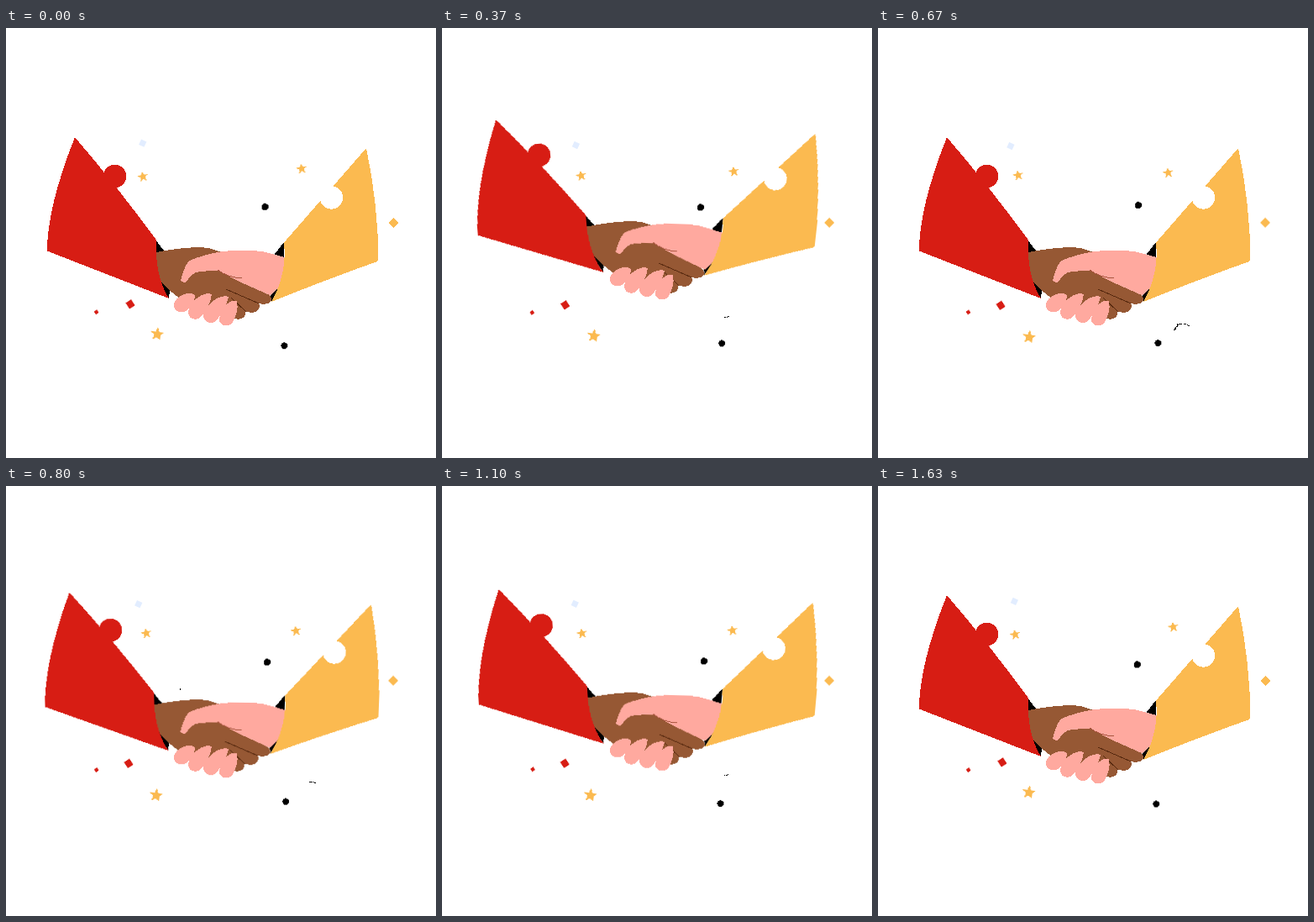
An HTML page that plays this animation: 512x512 px, repeating every 1670 ms.

```html
<!DOCTYPE html>
<html lang="en">
<head>
<meta charset="utf-8">
<title>Handshake</title>
<style>
  html, body { margin: 0; width: 100%; height: 100%; overflow: hidden; background: #fff; }
  svg {
    display: block; width: 100%; height: 100%; shape-rendering: crispEdges;
    --red: #d71d14; --gold: #fbba50; --brown: #965834; --pink: #ffa99f;
    /* smooth ease, held at ten poses per stroke */
    --held: linear(0 0% 10%, .028 10% 20%, .104 20% 30%, .216 30% 40%, .352 40% 50%,
      .5 50% 60%, .648 60% 70%, .784 70% 80%, .896 80% 90%, .972 90% 100%);
  }

  .lift, .sway { animation: lift 1670ms var(--held) -7ms infinite; }
  .sway { animation-name: sway; }
  @keyframes lift {
    0%, 40%, 80%, 100% { transform: translateY(0); }
    20% { transform: translateY(-32px); }
    60% { transform: translateY(-19.5px); }
  }
  @keyframes sway {
    0%, 40%, 80%, 100% { transform: translateX(0) rotate(0deg); }
    20%, 60% { transform: translateX(var(--dx)) rotate(var(--turn)); }
  }
  .red-arm { --dx: -2px; --turn: -5deg; transform-origin: 194px 322px; }
  .gold-arm { --dx: -4px; --turn: 6.6deg; transform-origin: 317px 325px; }
  .brown-hand { --dx: -4px; --turn: 0deg; }
  .pink-hand { --dx: -1px; --turn: 2deg; transform-origin: 300px 290px; }

  .drift { animation: drift 835ms cubic-bezier(.39, .575, .565, 1) infinite alternate; }
  .swing { animation: swing 835ms cubic-bezier(.37, 0, .63, 1) var(--late) infinite alternate; }
  .orbit { animation: orbit 1670ms linear infinite; }
  @keyframes drift {
    from { transform: translate(0, 0); }
    to { transform: translate(var(--x), var(--y)); }
  }
  @keyframes swing {
    from { transform: translate(calc(-1 * var(--x)), calc(-1 * var(--y))); }
    to { transform: translate(var(--x), var(--y)); }
  }
  @keyframes orbit {
    0%, 100% { transform: translate(0, 0); }
    15% { transform: translate(1px, 1.5px); }
    40% { transform: translate(0, 3.5px); }
    56% { transform: translate(-2.5px, 4px); }
    74% { transform: translate(-4px, 3.5px); }
  }

  .trail {
    fill: none; stroke: #000; stroke-dasharray: 4 1 3 2 4 1 3 1 4 2 3 1 3 200;
    stroke-dashoffset: 32; animation: 1670ms linear infinite;
  }
  .upper { animation-name: upper; }
  .lower { animation-name: lower; }
  @keyframes upper {
    0%, 47% { stroke-dashoffset: 32; }
    20%, 46.99%, 67%, 100% { stroke-dashoffset: -40; }
  }
  @keyframes lower {
    0%, 20%, 64% { stroke-dashoffset: 32; }
    52%, 63.99%, 96%, 100% { stroke-dashoffset: -57; }
  }
  .tick { fill: none; stroke: #000; stroke-dasharray: 1 1; animation: tick 1670ms step-end infinite; }
  @keyframes tick {
    0%, 78% { opacity: 0; }
    70% { opacity: 1; }
  }
</style>
</head>
<body>
<svg viewBox="0 0 512 512">
  <defs>
    <path id="star" d="M0-6.5 1.8-2.5 6.2-2 2.9.9 3.8 5.3 0 3.1-3.8 5.3-2.9.9-6.2-2-1.8-2.5Z"/>
    <path id="diamond" d="M0-6 6 0 0 6-6 0Z"/>
  </defs>

  <path class="trail upper" d="M207 244C207 238 211 234.500 217 234.500S226 237 227 243"/>
  <path class="tick" d="M220.500 232.500 222.500 229"/>
  <path class="trail lower" d="M336 345C344 342 356 344 356.500 355L352.500 360.500C355 353 362 349 370.500 355"/>

  <g class="lift">
    <path class="sway red-arm" d="M177 251 188 265 190 300 195 313 194 322 180 300Z"/>
    <path class="sway gold-arm" d="M331 255 320 269 326 290 315 316 316 326 331 300Z"/>

    <g class="sway brown-hand">
      <path fill="var(--brown)" d="M168 269 179 267C205 262 225 260 241 262L257 267 300 290 312 317Q318 321 315 326
        Q311 330 301 328 304 334 297 338 292 340 285 337 287 343 280 346 274 348 270 344
        L255 339 238 336 222 329 207 322Q190 310 181 297L168 288Z"/>
      <path fill="none" stroke="#57290f" d="M262 311 301 328M268 321 286 338"/>
    </g>

    <g class="sway pink-hand">
      <path fill="var(--pink)" d="M208 301C209 294 213 284 217 278 225 273 245 268 258 266 275 264 300 264 313 268
        L340 275 332 302 315 318.500 281 303.500 264 295 253 288.500Q238 289 226 291 219 295 215 302 211 304 208 301Z"/>
      <path fill="none" stroke="#a8553f" d="M252 288Q264 297 281 298"/>
    </g>

    <g fill="var(--pink)">
      <path d="M225 318C216 312 200 321 200 330 200 338 208 340 214 337 221 333 225 326 225 318Z"/>
      <path d="M245 317C235 313 220 325 217 337 216 346 225 349 231 345 238 338 244 327 245 317Z"/>
      <path d="M265 320C254 316 238 329 235 342 235 351 245 353 250 349 257 341 262 331 265 320Z"/>
      <path d="M275 325C266 322 256 334 254 346 253 355 264 356 269 352 274 344 277 334 275 325Z"/>
    </g>

    <g class="sway red-arm" fill="var(--red)">
      <path d="M82 130Q133 189.500 179 252.500 177 295 194 322L49 265.500Q49 213 82 130Z"/>
      <circle cx="129.500" cy="176.500" r="13.700"/>
    </g>
    <g class="sway gold-arm">
      <path fill="var(--gold)" d="M429 143 331 255.500Q335 292 316 326 380 300 442 278L443.500 275Q443 210 429 143Z"/>
      <circle cx="387.500" cy="202" r="13.700" fill="#fff"/>
    </g>
  </g>

  <g class="drift" style="--x:-5px;--y:3.5px">
    <rect x="-3.500" y="-3.500" width="7" height="7" fill="#e2edff" transform="translate(162.500 136.500) rotate(25)"/>
  </g>
  <g fill="var(--gold)">
    <g class="drift" style="--x:4px;--y:-1.7px"><use href="#star" transform="translate(163 177) rotate(-10)"/></g>
    <g class="drift" style="--x:-6.800px;--y:5px"><use href="#star" transform="translate(352 167.500) rotate(-8)"/></g>
    <g class="orbit"><use href="#star" transform="translate(180 364.500) rotate(8) scale(1.250)"/></g>
    <g class="drift" style="--x:-.5px;--y:-.3px"><use href="#diamond" transform="translate(461 232)"/></g>
  </g>
  <g fill="var(--red)">
    <g class="drift" style="--x:-2px;--y:1.500px"><use href="#diamond" transform="translate(148 328.800) rotate(12) scale(.95)"/></g>
    <g class="swing" style="--x:-.4px;--y:.8px;--late:-468ms">
      <use href="#diamond" transform="translate(107.200 338) rotate(10) scale(.5)"/>
    </g>
  </g>
  <g class="swing" style="--x:-2.200px;--y:2.700px;--late:-600ms"><circle cx="309.800" cy="211.300" r="4"/></g>
  <g class="swing" style="--x:1.400px;--y:-2.200px;--late:-267ms"><circle cx="332.200" cy="377.200" r="3.800"/></g>
</svg>
</body>
</html>
```
